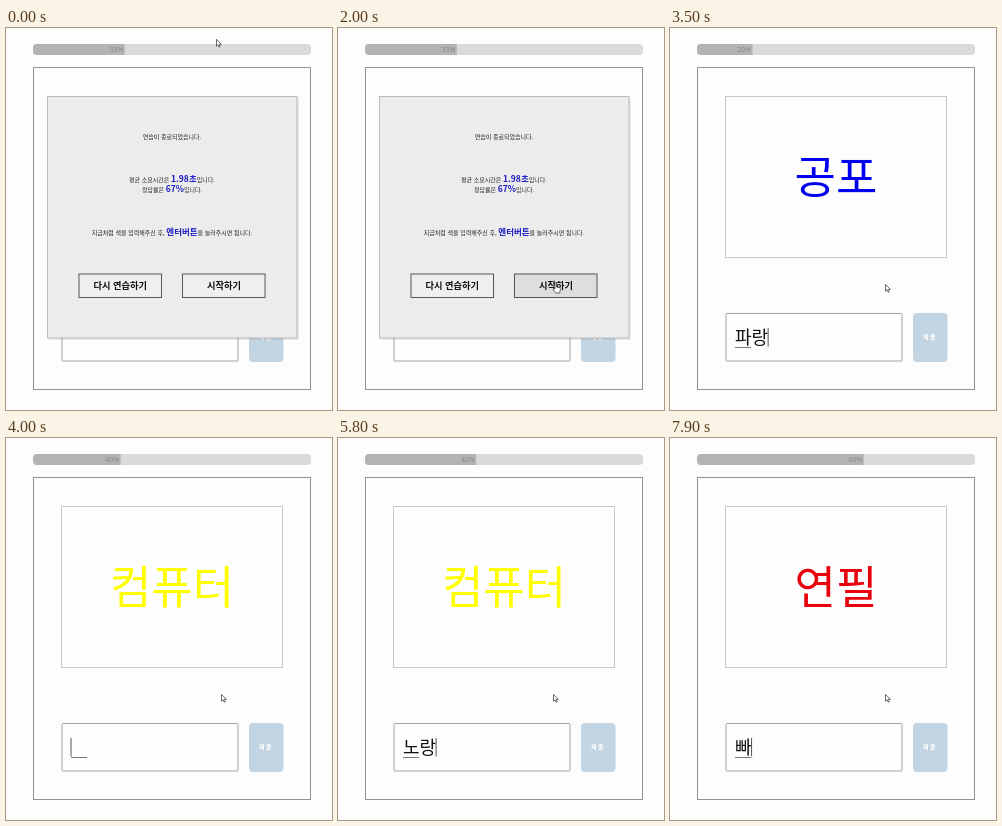
These frames come from a looping animation (326x382 px, 8000 ms). An HTML page:

```html
<!DOCTYPE html>
<html lang="ko">
<head>
<meta charset="utf-8">
<style>
  html, body { margin: 0; width: 100%; height: 100%; overflow: hidden; background: #fdfdfe; }
  svg { display: block; font-family: "Noto Sans CJK KR", "Noto Sans CJK", "Noto Sans", sans-serif; }
  .line { fill: none; stroke-width: 1; }
  .mid { text-anchor: middle; }
  .small { font-size: 6px; fill: #222; }
  .small tspan { font-size: 8.5px; font-weight: 700; fill: #1c1cc4; }
  .label { font-size: 9.25px; font-weight: 700; fill: #111; }
  .choice { fill: #efeff0; stroke: #555; }
  .choice.hover { fill: #dededf; }
</style>
</head>
<body>
<svg width="326" height="382" viewBox="0 0 326 382">
  <clipPath id="track"><rect x="27" y="16" width="278" height="11" rx="4"/></clipPath>
  <g clip-path="url(#track)">
    <rect x="27" y="16" width="278" height="11" fill="#d9dadb"/>
    <rect id="fill" x="27" y="16" height="11" fill="#b3b3b4"/>
  </g>
  <text id="percent" y="24" font-size="7" fill="#858585" text-anchor="end" font-family="Open Sans, sans-serif"></text>

  <rect class="line" x="27.5" y="39.5" width="277" height="322" stroke="#929294"/>
  <rect class="line" x="55.5" y="68.5" width="221" height="161" stroke="#c8c8ca"/>
  <text id="word" class="mid" x="166" y="166.4" font-size="45"></text>

  <rect class="line" x="56" y="285.5" width="176" height="47.5" rx="1" stroke="#a2a2a4"/>
  <text id="typed" x="65" y="315.7" font-size="18" fill="#111"></text>
  <path id="underline" class="line" d="M65 319.5H81" stroke="#777"/>
  <rect id="caret" y="300" width="1" height="18.5" fill="#555"/>

  <rect x="243" y="285" width="34.5" height="49" rx="4" fill="#c3d5e2"/>
  <text class="mid" x="260" y="311.3" font-size="6" font-weight="700" letter-spacing="1.6" fill="#fff">제출</text>

  <g id="dialog">
    <rect x="43" y="70" width="250" height="242" fill="#000" opacity=".07"/>
    <rect x="41.5" y="68.5" width="249.5" height="241.5" fill="#ececed" stroke="#b9b9bb"/>
    <text class="mid small" x="166" y="111.3">연습이 종료되었습니다.</text>
    <text class="mid small" x="166" y="154.3">평균 소요시간은 <tspan>1.98초</tspan>입니다.</text>
    <text class="mid small" x="166" y="164.3">정답률은 <tspan>67%</tspan>입니다.</text>
    <text class="mid small" x="166" y="207">지금처럼 색을 입력해주신 후, <tspan>엔터버튼</tspan>을 눌러주시면 됩니다.</text>
    <rect class="choice" x="73" y="246" width="82.5" height="23.5"/>
    <text class="mid label" x="114.3" y="261.3">다시 연습하기</text>
    <rect id="start" class="choice" x="176.5" y="246" width="82.5" height="23.5"/>
    <text class="mid label" x="218" y="261.3">시작하기</text>
  </g>

  <g id="pointer" fill="#fff" stroke="#444" stroke-width=".8" stroke-linejoin="round">
    <path id="arrow" d="M.5 .3V7.2L2.1 5.8L3.2 8.2L4.3 7.7L3.2 5.4H5.3Z"/>
    <path id="hand" d="M2 5V-.6Q2.8 -1.6 3.5 -.6V3L6.6 3.8Q7.6 4.2 7.4 5.5L6.6 9H2.7L.2 5.7Q0 4.4 1 4.5Z"/>
  </g>
</svg>
<script>
const LOOP = 8000, STEP = 100, EASE_MS = 600, GLYPH = 16.56;
const el = id => document.getElementById(id);
const show = (id, on) => el(id).style.display = on ? "" : "none";
const set = (id, name, value) => el(id).setAttribute(name, value);

const rounds = [
  { at: 0, percent: 33, word: "", color: "#00e" },
  { at: 2100, percent: 20, word: "공포", color: "#0000f0" },
  { at: 3800, percent: 40, word: "컴퓨터", color: "#ffff00" },
  { at: 5850, percent: 60, word: "연필", color: "#e8000c" }
];
const edits = [
  [2100, ""], [3000, "ㅍ"], [3200, "파"], [3300, "팔"], [3400, "파라"], [3500, "파랑"],
  [3800, ""], [5200, "ㄴ"], [5300, "노"], [5400, "놀"], [5500, "노라"], [5600, "노랑"],
  [5850, ""], [7700, "ㅃ"], [7900, "빠"]
];
const path = [
  [0, 210, 11], [100, 212, 11], [400, 290, 20], [700, 320, 70],
  [1000, 320, 150], [1400, 290, 215], [1800, 215, 256], [LOOP, 215, 256]
];

// CSS "ease": cubic-bezier(.25, .1, .25, 1)
function ease(x) {
  if (x >= 1) return 1;
  const bezier = (s, a, b) => 3 * (1 - s) ** 2 * s * a + 3 * (1 - s) * s * s * b + s ** 3;
  let lo = 0, hi = 1;
  for (let i = 0; i < 20; i++) {
    const s = (lo + hi) / 2;
    if (bezier(s, .25, .25) < x) lo = s; else hi = s;
  }
  return bezier(lo, .1, 1);
}

function drawProgress(t) {
  const i = rounds.findLastIndex(r => t >= r.at);
  const now = rounds[i], from = rounds[Math.max(0, i - 1)].percent;
  const level = from + (now.percent - from) * ease((t - now.at) / EASE_MS);
  const width = 2.78 * level;
  set("fill", "width", width);
  set("percent", "x", 25.5 + width);
  el("percent").textContent = now.percent + "%";
  el("word").textContent = now.word;
  set("word", "fill", now.color);
}

function drawInput(t) {
  const [at, text] = edits.findLast(e => t >= e[0]) || [0, ""];
  el("typed").textContent = text;
  set("caret", "x", 64.5 + GLYPH * text.length);
  show("caret", at && Math.floor((t - at) / 500) % 2 === 0);
  show("underline", t >= 3000);
}

function drawPointer(t, dialog) {
  const i = path.findIndex(p => t < p[0]);
  const [t0, x0, y0] = path[i - 1], [t1, x1, y1] = path[i];
  const k = (t - t0) / (t1 - t0);
  const x = x0 + (x1 - x0) * k, y = y0 + (y1 - y0) * k;
  const hover = dialog && x > 176 && x < 259 && y > 246 && y < 270;
  set("pointer", "transform", `translate(${x} ${y})`);
  show("arrow", !hover);
  show("hand", hover);
  el("start").classList.toggle("hover", hover);
}

function draw(ms) {
  const t = Math.floor(ms % LOOP / STEP) * STEP;
  const dialog = t < 2100;
  show("dialog", dialog);
  drawProgress(t);
  drawInput(t);
  drawPointer(t, dialog);
}

let origin;
function tick(now) {
  origin ??= now;
  draw(now - origin);
  requestAnimationFrame(tick);
}
draw(0);
requestAnimationFrame(tick);
</script>
</body>
</html>
```
